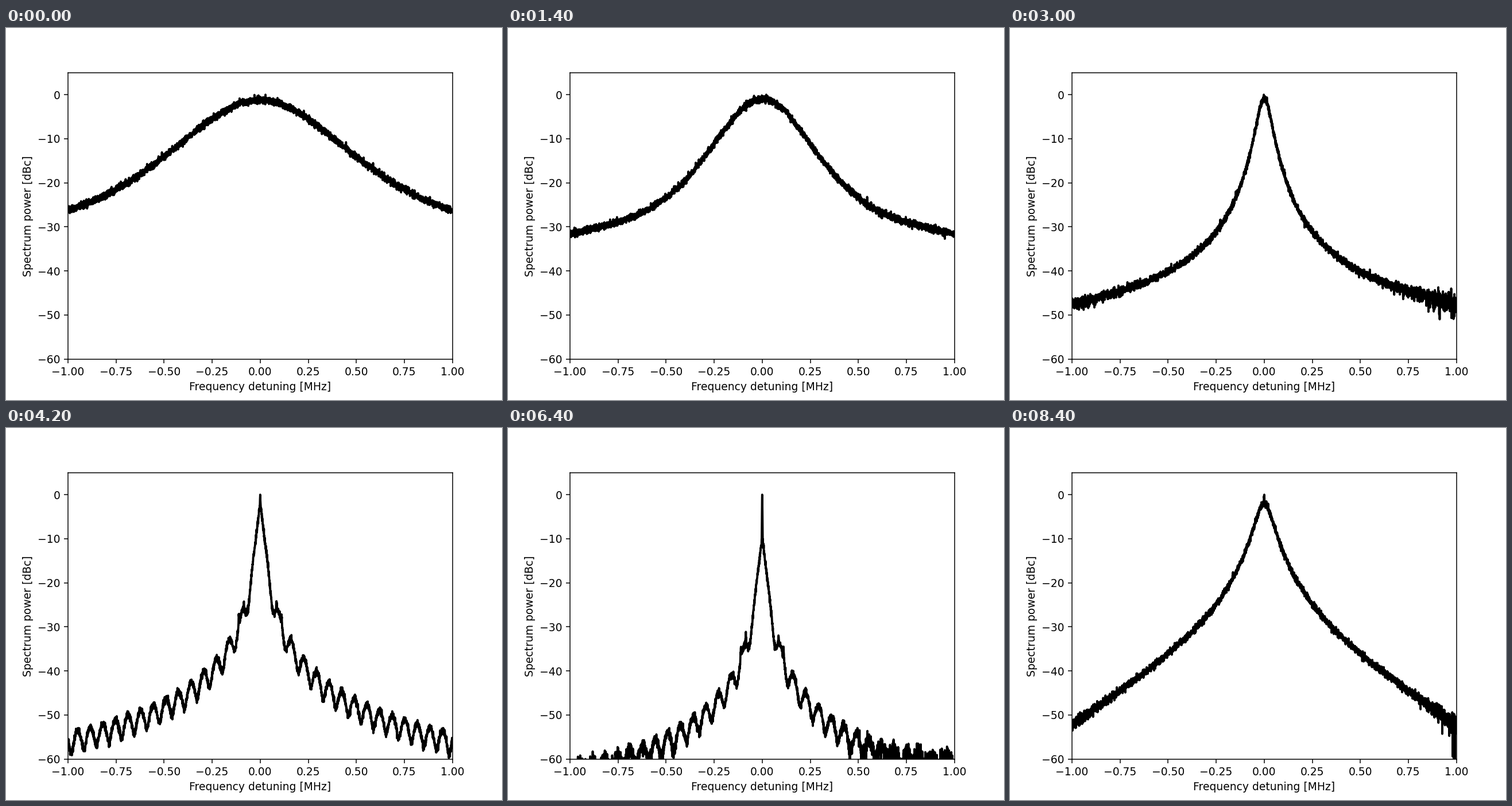
A matplotlib script for the animation above (8600 ms loop, 864 px wide and 648 px high).

```python
import numpy as np
import matplotlib.pyplot as plt
from matplotlib.animation import FuncAnimation

FRAMES, INTERVAL = 43, 200
FRINGE = 0.0655  # spacing of the interference ripple in MHz

freq = np.linspace(-1, 1, 4001)
detune = np.abs(freq)


def lin(value):
    return 10 ** (value / 10)


def ramp(k, times, values):
    return np.interp(k, times, values)


def peak(centre, width):
    return np.exp(-((detune - centre) / width) ** 2)


def spectrum(k):
    rng = np.random.default_rng(100 + k)

    # The line narrows, holds while it is coherent, then widens again.
    width = np.exp(ramp(k, [0, 7, 15, 21, 32, 42],
                        np.log([.467, .275, .0405, .0103, .0103, .049])))
    order = ramp(k, [7, 15, 21], [4, 2, 1.5])
    pedestal = lin(ramp(k, [18, 21, 25, 32, 42], [0, .5, -10.5, -7.3, -2.3]))
    contrast = ramp(k, [15, 21, 32, 42], [0, .5, .5, 0])
    rolloff = ramp(k, [32, 42], [0, 11.5])
    floor = lin(ramp(k, [7, 15, 21, 42], [-52, -54, -72, -58]))

    # Steep core with a weak Lorentzian tail.
    spread = 1 + (detune / width) ** 2
    power = spread ** -order + .012 / spread
    power *= 1 - contrast * np.cos(2 * np.pi * freq / FRINGE)
    power += contrast * lin(-26) * (peak(.085, .002) + .6 * peak(.111, .002))
    power *= pedestal * lin(-rolloff * detune ** 1.5)

    # A brief spur left of the carrier.
    spur = max(0, 1 - abs(k - 25) / 2)
    power += spur * lin(-50.5) * np.exp(-np.abs(freq + .607) / .011)

    power *= lin(rng.normal(0, .4, freq.size))
    power += (1 - pedestal * (1 - contrast)) * peak(0, .0013)
    power += floor * (1 + .4 * freq) * rng.normal(size=freq.size)
    return 10 * np.log10(np.maximum(power, 1e-8) / power.max())


fig, ax = plt.subplots(figsize=(6.4, 4.8), dpi=135)
line, = ax.plot([], [], color="black", lw=2)
ax.set_xlim(-1, 1)
ax.set_ylim(-60, 5)
ax.set_xlabel("Frequency detuning [MHz]")
ax.set_ylabel("Spectrum power [dBc]")


def update(k):
    line.set_data(freq, spectrum(k))
    return line,


anim = FuncAnimation(fig, update, frames=FRAMES, interval=INTERVAL,
                     repeat=True, repeat_delay=0)
plt.show()
```
